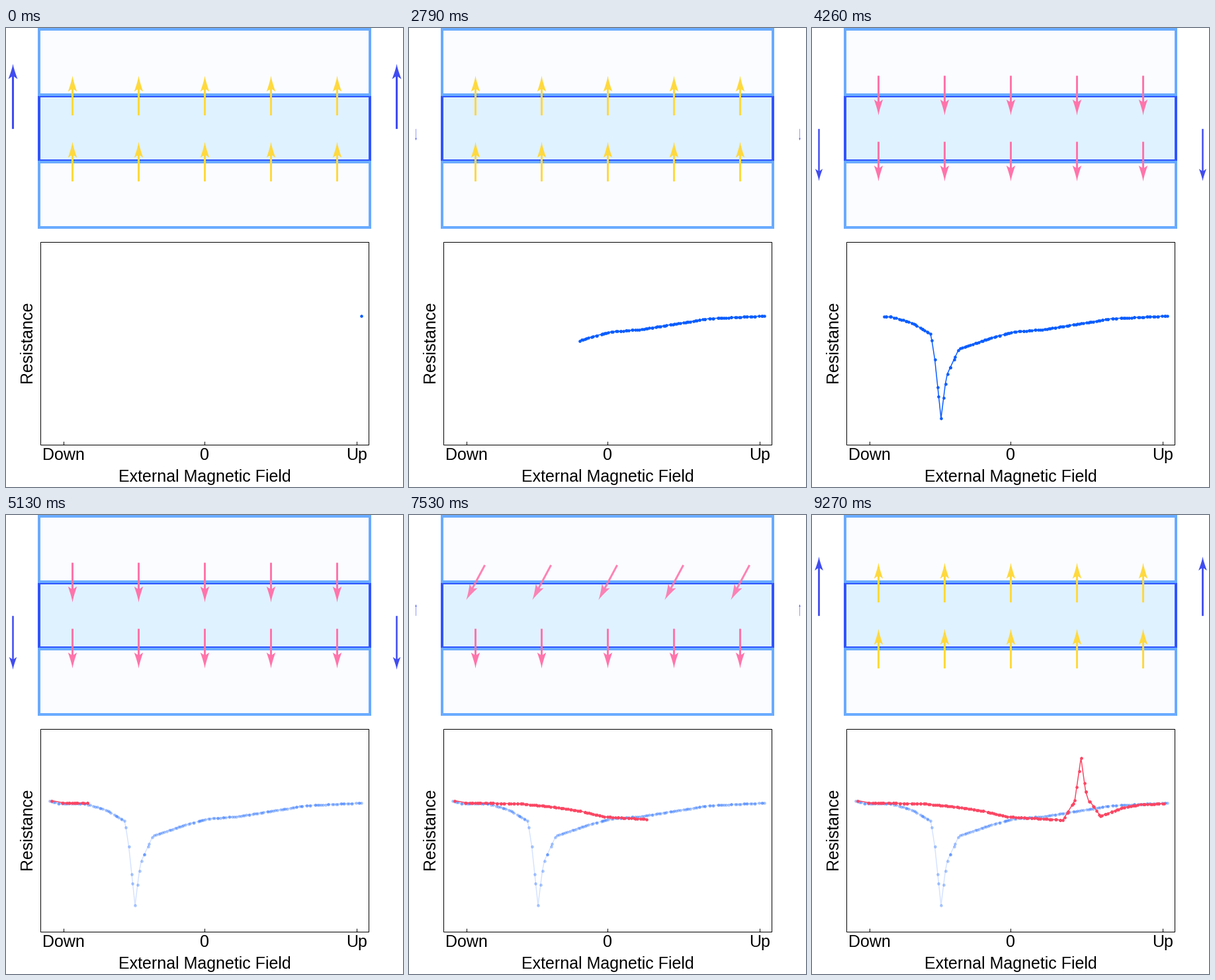
These frames come from a looping animation (600 by 695 pixels, 9300 ms). A matplotlib script:

```python
import numpy as np
import matplotlib.pyplot as plt
from matplotlib.animation import FuncAnimation
from matplotlib.collections import PolyCollection
from matplotlib.colors import to_rgb
from matplotlib.patches import Rectangle

W, H, DPI = 600, 695, 100
FRAMES, STEP = 310, 30
TURN = 157          # frame at which the sweep reverses
FLIP = 20           # frames one magnetisation flip takes
PX = 72 / DPI       # points per pixel

BLUE, RED, FIELD = "#0a5cff", "#fb4562", "#404cf0"
YELLOW, PINK = np.array(to_rgb("#ffd93e")), np.array(to_rgb("#ff74ab"))

fig = plt.figure(figsize=(W / DPI, H / DPI), dpi=DPI, facecolor="white")
ax = fig.add_axes([0, 0, 1, 1])
ax.set(xlim=(0, W), ylim=(H, 0))
ax.axis("off")


# ---- measured curves -------------------------------------------------
def sweep(keys, curve, seed):
    """One unevenly spaced sample per frame, from (index, x) keys."""
    idx, pos = np.transpose(keys)
    i = np.arange(idx[-1] + 1)
    noise = np.random.default_rng(seed).normal(0, 1.2, len(i))
    noise[idx.astype(int)] = 0
    x = np.sort(np.interp(i, idx, pos) + noise)
    y = np.interp(x, *np.transpose(curve))
    return (x, y) if pos[-1] > pos[0] else (x[::-1], y[::-1])


down_xy = sweep(
    [(0, 537), (93, 258), (113, 195), (118, 179), (156, 66)],
    [(66, 433), (80, 437), (121, 437.5), (150, 446), (179, 463), (184, 487),
     (195, 591), (203, 527), (222, 486), (271, 469), (305, 460), (350, 456.5),
     (453, 440), (537, 436)], seed=4)
up_xy = sweep(
    [(0, 69), (1, 85), (66, 272), (108, 400), (110, 406.5), (152, 532)],
    [(69, 432.5), (85, 435.5), (170, 437.3), (210, 441), (255, 447.5),
     (297, 457), (350, 460), (379, 462), (397, 433), (406.5, 368), (416, 436),
     (420, 433.5), (436, 456), (470, 443), (495, 438.5), (532, 437)], seed=9)


# ---- arrows ----------------------------------------------------------
def arrow(length, shaft, head_w, head_l, notch):
    """Outline of an upward arrow, tail at the origin, hollow-sided head."""
    t = np.linspace(1, 0, 6)
    x = np.r_[shaft / 2, shaft / 2, head_w / 2 * t ** 1.25]
    y = np.r_[0, length - notch, length - head_l * t]
    right = np.column_stack([x, y])
    return np.vstack([right, right[-2::-1] * (-1, 1)])


SPIN = arrow(60, 3, 13.5, 24, 20.5) - (0, 30)
PULL = arrow(1, 0.031, 0.143, 0.235, 0.195)
SPIN_X = np.arange(100.5, 600, 100)


def spin_row(cy, deg):
    a = np.radians(deg)
    x, y = SPIN.T
    px = x * np.cos(a) - y * np.sin(a)
    py = cy - (x * np.sin(a) + y * np.cos(a))
    return [np.column_stack([cx + px, py]) for cx in SPIN_X]


def field_arrows(length):
    shape = PULL * (abs(length), -length)
    return [shape + (x, 152.8) for x in (10.5, 590.5)]


def smooth(k):
    k = np.clip(k, 0, 1)
    return k * k * (3 - 2 * k)


def spin_state(f, first, second):
    """Angle and colour of a row that flips down, then up again."""
    k1, k2 = (np.clip((f - s) / FLIP, 0, 1) for s in (first, second))
    deg = 180 * (smooth(k1) - smooth(k2))
    mix = smooth(3 * k1 - 1) - smooth(3 * k2 - 1)
    k = k2 if k2 > 0 else k1
    alpha = 1 - 0.55 * np.sin(np.pi * k * k)
    return deg, (*(YELLOW + (PINK - YELLOW) * mix), alpha)


def field(f):
    return 98.5 - 1.25 * f if f < TURN else -98.7 + 1.24 * (f - TURN)


# ---- static parts ----------------------------------------------------
def box(y0, y1, face, edge, x0=50, x1=550, lw=4, **kw):
    ax.add_patch(Rectangle((x0, y0), x1 - x0, y1 - y0, fc=face, ec=edge,
                           lw=lw * PX, joinstyle="miter", **kw))


def label(x, y, text, **kw):
    ax.text(x, y, text, family="Liberation Sans", size=25 * PX,
            ha="center", va="baseline", color="black", **kw)


box(103, 201, "#dff2ff", "#2f55ff")
box(2, 101, "#fbfcff", "#69abff", zorder=2)
box(203, 302, "#fbfcff", "#69abff", zorder=2)
box(324.5, 631.5, "none", "black", 52.5, 548.5, lw=1, snap=False)
for tx, name in ((87.5, "Down"), (300.5, "0"), (530.5, "Up")):
    ax.plot([tx, tx], [627, 631], color="black", lw=PX, snap=False)
    label(tx - 0.5, 654, name)
label(300, 687, "External Magnetic Field")
label(39, 475.5, "Resistance", rotation=90, rotation_mode="anchor")


# ---- moving parts ----------------------------------------------------
def trace(color, z):
    line, = ax.plot([], [], color=color, lw=1.5 * PX, zorder=z)
    dots, = ax.plot([], [], "o", color=color, ms=4.6 * PX, mew=0, zorder=z)
    return line, dots


down_trace, up_trace = trace(BLUE, 4), trace(RED, 5)
rows = [PolyCollection([], lw=0, zorder=6) for _ in range(2)]
pull = PolyCollection([], fc=FIELD, lw=0, zorder=6)
for c in (*rows, pull):
    ax.add_collection(c, autolim=False)


def reveal(arts, xy, n):
    for art in arts:
        art.set_data(*(v[:n] for v in xy))


def draw(f):
    n = max(0, f - TURN + 1)
    reveal(down_trace, down_xy, f + 1)
    reveal(up_trace, up_xy, n)
    for art, faded in zip(down_trace, (0.17, 0.34)):
        art.set_alpha(faded if n else 1)

    for row, cy, flips in zip(rows, (102.3, 202.3), ((94, 246), (115, 262))):
        deg, color = spin_state(f, *flips)
        row.set_verts(spin_row(cy, deg))
        row.set_facecolor(color)
    pull.set_verts(field_arrows(field(f)))
    return (*down_trace, *up_trace, *rows, pull)


anim = FuncAnimation(fig, draw, frames=FRAMES, interval=STEP,
                     repeat=True, repeat_delay=0, blit=False)
plt.show()
```
